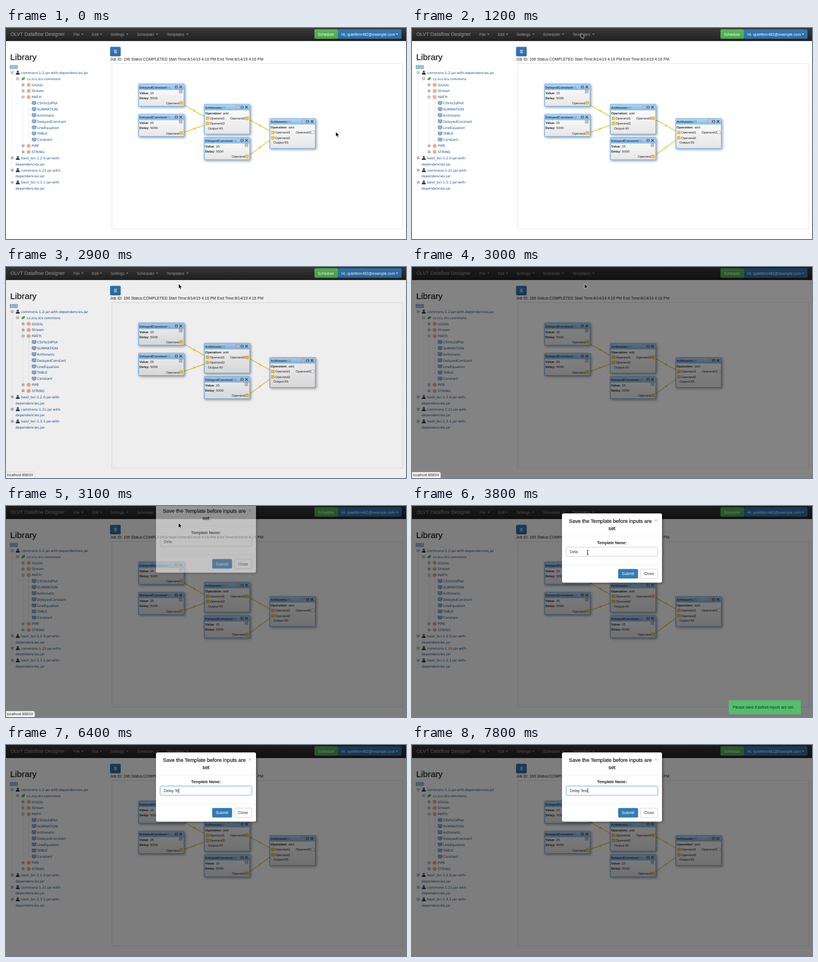
An HTML page that plays this animation: 712x376 px, repeating every 8 s.

```html
<!DOCTYPE html>
<html lang="en">
<head>
<meta charset="utf-8">
<title>Workflow designer</title>
<style>
html, body { margin: 0; width: 100%; height: 100%; overflow: hidden; background: #fff; }
svg { display: block; width: 712px; height: 376px; }
text { font-family: "Liberation Sans", Arial, sans-serif; white-space: pre; }
.tree text { font-family: "DejaVu Sans", Verdana, sans-serif; font-size: 6px; fill: #14528f; }
</style>
</head>
<body>
<svg id="stage" viewBox="0 0 712 376" xmlns="http://www.w3.org/2000/svg">
  <defs>
    <linearGradient id="nav" x2="0" y2="1"><stop stop-color="#3a3a3a"/><stop offset="1" stop-color="#202020"/></linearGradient>
    <linearGradient id="blue" x2="0" y2="1"><stop stop-color="#337ab7"/><stop offset="1" stop-color="#2d6ca5"/></linearGradient>
    <linearGradient id="green" x2="0" y2="1"><stop stop-color="#5cb85c"/><stop offset="1" stop-color="#4ba64b"/></linearGradient>
    <linearGradient id="body" x2="0" y2="1"><stop stop-color="#fff"/><stop offset="1" stop-color="#e6e6e6"/></linearGradient>
    <linearGradient id="head" x2="0" y2="1"><stop stop-color="#aed4f6"/><stop offset="1" stop-color="#8abce8"/></linearGradient>
    <filter id="shadow" x="-20%" y="-20%" width="150%" height="160%">
      <feDropShadow dx="1.6" dy="1.6" stdDeviation="2" flood-color="#000" flood-opacity=".4"/>
    </filter>
    <filter id="glow" x="-10%" y="-40%" width="120%" height="180%">
      <feDropShadow dx="0" dy="0" stdDeviation="1.2" flood-color="#66afe9" flood-opacity=".5"/>
    </filter>
  </defs>
  <g id="page"></g>
  <g id="menu"></g>
  <rect id="dim" width="712" height="376"/>
  <g id="modal"></g>
  <g id="toast"></g>
  <g id="status"></g>
  <g id="arrow"><path d="M0 0V8.6L2 6.8L3.4 9.8L4.8 9.1L3.5 6.2H6.2Z" fill="#000" stroke="#fff" stroke-width=".6"/></g>
  <g id="hand"><path d="M-.6 .6Q.3-.6 1 .6V3.4L4.6 4.2Q5.2 4.5 5 6L4.2 9H.2L-2.6 5.6Q-2.4 4.4-.6 5.6Z" fill="#fff" stroke="#111" stroke-width=".8"/></g>
  <g id="beam"><path d="M-1.7-4.2Q0-4.2 0-3Q0-4.2 1.7-4.2M0-3V3M-1.7 4.2Q0 4.2 0 3Q0 4.2 1.7 4.2M-.9 .8H.9" fill="none" stroke="#111" stroke-width=".8"/></g>
</svg>
<script>
const LOOP = 8000, STEP = 100;
const $ = id => document.getElementById(id);

// Markup helpers
const text = (x, y, s, size = 6.9, fill = '#333', more = '') =>
  `<text x="${x}" y="${y}" font-size="${size}" fill="${fill}" ${more}>${s}</text>`;
const rect = (x, y, w, h, fill, more = '') =>
  `<rect x="${x}" y="${y}" width="${w}" height="${h}" fill="${fill}" ${more}/>`;
const path = (d, stroke, width = 1, more = '') =>
  `<path d="${d}" fill="none" stroke="${stroke}" stroke-width="${width}" ${more}/>`;
const circle = (x, y, r, fill, more = '') => `<circle cx="${x}" cy="${y}" r="${r}" fill="${fill}" ${more}/>`;
const caretDown = (x, y, fill) => `<path d="M${x} ${y}h4l-2 2.1z" fill="${fill}"/>`;
const BOLD = 'font-weight="700"';
const MEDIUM = 'stroke="#222" stroke-width=".25"';

function navbar() {
  const items = [['File', 120, 134], ['Edit', 153, 167], ['Settings', 186, 214], ['Scheduler', 233, 267], ['Templates', 286, 321]];
  return rect(0, 0, 712, 23, 'url(#nav)') + rect(0, 22.5, 712, .7, '#101010') +
    `<rect id="openTab" x="279" y="0" width="53" height="23" fill="#0b0b0b"/>` +
    text(8, 14, 'OLVT Dataflow Designer', 8.82, '#9d9d9d') +
    items.map(([name, x, cx]) => `<g ${name === 'Templates' ? 'id="templates"' : ''} fill="#9d9d9d">` +
      `<text x="${x}" y="13.5" font-size="6.86">${name}</text><path d="M${cx} 10.2h4l-2 2.1z"/></g>`).join('') +
    rect(549, 2.2, 42, 17, 'url(#green)', 'rx="2"') + text(555, 13.5, 'Schedule', 6.9, '#fff') +
    rect(591, 2.2, 113, 17, 'url(#blue)', 'rx="2"') +
    text(597, 13.5, 'Hi, quietfern482@example.com', 6.8, '#fff') + caretDown(694, 10.2, '#fff');
}

const icons = {
  jar: (x, y) => circle(x, y - 1.6, 1.9, '#24364e') + `<path d="M${x - 3.6} ${y + 3.4}q0-3.4 3.6-3.4t3.6 3.4z" fill="#24364e"/>` +
    rect(x - 1, y - 1.6, 2, 1.4, '#8fa6c2'),
  leaf: (x, y) => `<path d="M${x - 3} ${y + 2.6}q-.6-5.4 6-5.6q.6 6-6 5.6z" fill="#4caf3f"/>`,
  ring: (x, y) => circle(x, y, 2.9, '#f8cdb0', 'stroke="#e5854f" stroke-width=".9"') + circle(x, y, 1, '#df7038'),
  screen: (x, y) => rect(x - 3.5, y - 3, 7, 4.8, '#8fb4dc', 'stroke="#5f82ac" stroke-width=".7"') + rect(x - 1.8, y + 2.3, 3.6, 1, '#7d8c9c')
};
const expander = (x, y, open) => rect(x - 2, y - 2, 4, 4, '#f4f4f4', 'stroke="#8a8a8a" stroke-width=".6"') +
  path(`M${x - 1.2} ${y}h2.4` + (open ? '' : `M${x} ${y - 1.2}v2.4`), '#444', .6);

function tree() {
  const rows = [
    [0, 'jar', 'commons-1.2-jar-with-dependencies.jar', 1], [1, 'leaf', 'cz.zcu.kiv.commons', 1],
    [2, 'ring', 'IOUtils'], [2, 'ring', 'Stream'], [2, 'ring', 'MATH', 1],
    ...['CSVto2dPlot', 'SUMMATION', 'Arithmetic', 'DelayedConstant', 'LineEquation', 'TABLE', 'Constant'].map(n => [3, 'screen', n]),
    [2, 'ring', 'PIPE'], [2, 'ring', 'STRING'],
    ...['basil_bci-1.2.0-jar-with-', 'commons-1.21-jar-with-', 'basil_bci-1.3.1-jar-with-']
      .flatMap(n => [[0, 'jar', n], [-1, '', 'dependencies.jar']])
  ];
  const rowY = i => 79.6 + i * 10.86;
  const guide = 'stroke-dasharray=".8 1"';
  let out = path(`M11 80V${rowY(18)}M21 91V${rowY(1)}M30.5 95V${rowY(13)}M40.5 127V${rowY(11)}`, '#bbb', .5, guide);
  rows.forEach(([level, icon, name, open], i) => {
    const y = rowY(i), x = 11 + level * 9.7;
    if (level < 0) { out += `<text x="17" y="${y + 2.2}">${name}</text>`; return; }
    out += path(`M${x} ${y}h8`, '#bbb', .5, guide);
    if (level < 3) out += expander(x, y, open);
    out += icons[icon](x + 10, y) + `<text x="${[27, 37, 46, 55.3][level]}" y="${y + 2.2}">${name}</text>`;
  });
  for (const x of [7.5, 14.8]) out += rect(x, 66.8, 5.4, 5.4, '#eaf3fc', 'stroke="#2f73b5" stroke-width=".9"') +
    path(`M${x + 1.3} 69.5h2.8M${x + 2.7} 68.1v2.8`, '#2f73b5', .8);
  return `<g class="tree">${out}</g>`;
}

const port = (x, y, fill = '#f7c53c') => rect(x - 2.5, y - 2.5, 5, 5, fill, `stroke="${fill === '#fff' ? '#999' : '#d3a02a'}" stroke-width=".6"`);
const grid = (x, y) => rect(x - 2.8, y - 2.8, 5.6, 5.6, '#e4e8ec', 'stroke="#8a8f95" stroke-width=".6"') +
  path(`M${x - 2.8} ${y - 1}h5.6m-5.6 2h5.6M${x - 1} ${y - 2.8}v5.6m2-5.6v5.6`, '#8f959b', .5);

function block(x, y, w, h, name, id, content) {
  const hx = x + w;
  return rect(x, y, w, h, 'url(#body)', 'stroke="#6fb0e6" stroke-width="1.3" rx="1" filter="url(#shadow)"') +
    rect(x + .7, y + .7, w - 1.4, 9.3, 'url(#head)') + path(`M${x} ${y + 10.2}h${w}`, '#7ab9ea', .6) +
    `<text x="${x + 1.3}" y="${y + 7.6}" font-size="6" font-weight="700" fill="#2b3f55">${name}` +
    `<tspan font-weight="400" fill="#71889c">#${id}</tspan></text>` +
    circle(hx - 13.8, y + 4.9, 2.9, '#667788') + rect(hx - 14.2, y + 4.4, .9, 2.3, '#fff') + rect(hx - 14.2, y + 3, .9, .9, '#fff') +
    path(`M${hx - 8.2} ${y + 2.6}l4.6 4.6m0-4.6l-4.6 4.6`, '#44566a', 1.3) + content;
}
const pair = (x, y, key, value) =>
  `<text x="${x}" y="${y}" font-size="6" fill="#222"><tspan font-weight="700">${key}</tspan>: ${value}</text>`;
const small = (x, y, s) => text(x, y, s, 6.05, '#222');

function constant(x, y, id, value) {
  return block(x, y, 81, 39.5, 'DelayedConstant', id,
    pair(x + 1.5, y + 17.5, 'Value', value) + pair(x + 1.5, y + 26.6, 'Delay', 5000) +
    grid(x + 75, y + 13.2) + small(x + 49, y + 35.7, 'Operand') + port(x + 76.2, y + 33.4));
}
function arithmetic(x, y, id, output, outPort) {
  return block(x, y, 81, 53, 'Arithmetic', id,
    grid(x + 59.5, y + 4.9) + pair(x + 1.5, y + 17.6, 'Operation', 'add') +
    port(x + 5.5, y + 24.6) + small(x + 9.4, y + 26.8, 'Operand1') + small(x + 46, y + 26.8, 'Operand3') + port(x + 76.3, y + 24.6, outPort) +
    port(x + 5.5, y + 34) + small(x + 9.4, y + 36.2, 'Operand2') + small(x + 6.4, y + 44.7, 'Output:' + output));
}
function wire(x1, y1, x2, y2) {
  const angle = Math.atan2(y2 - y1, x2 - x1) * 180 / Math.PI;
  return path(`M${x1} ${y1}L${x2} ${y2}`, '#f1c232', 1.4) +
    `<path d="M-2-2L2 0L-2 2" fill="none" stroke="#e8b828" stroke-width=".7" transform="translate(${(x1 + x2) / 2} ${(y1 + y2) / 2}) rotate(${angle})"/>`;
}

// Wires join port centres and pass beneath the blocks
$('page').innerHTML = rect(0, 0, 712, 376, '#fff') + navbar() +
  text(7.5, 57, 'Library', 15.4, '#222', MEDIUM) + tree() +
  rect(185.2, 33.5, 19, 17, 'url(#blue)', 'rx="2"') + path('M192.3 39.8h5M192.3 42h5M192.3 44.2h5', '#fff', 1) +
  text(185.3, 58, 'Job ID: 196 Status:COMPLETED Start Time:8/14/19 4:16 PM End Time:8/14/19 4:16 PM', 6.95, '#222') +
  rect(188.5, 63.5, 518, 294.5, 'none', 'stroke="#c4c4c4" stroke-width=".8" stroke-dasharray="1.2 1"') +
  wire(312, 134.5, 358.5, 160.8) + wire(312, 187.8, 358.5, 171) + wire(429.5, 161.2, 475, 186.5) + wire(429.5, 229.2, 475, 196) +
  constant(236, 100, 1, 15) + constant(236, 153.8, 2, 25) + arithmetic(353, 136.2, 4, 40) +
  constant(353, 195.3, 3, 15) + arithmetic(469.6, 161.6, 5, 55, '#fff');

$('menu').innerHTML = rect(279, 23.5, 114, 56.5, '#fff', 'rx="1.5" stroke="#c6c6c6" stroke-width=".6" filter="url(#shadow)"') +
  ['Save Template without data', 'Open Templates (no data)', 'Save Workflow with results', 'Open WorkFlows (with results)']
    .map((s, i) => text(289.3, 35 + i * 12.85, s, 6.9, '#333')).join('');

$('modal').innerHTML = rect(267, 13.3, 178, 123.2, '#fff', 'rx="3" filter="url(#shadow)"') +
  text(353, 30.2, 'Save the Template before inputs are', 9.2, '#222', 'text-anchor="middle" ' + MEDIUM) +
  text(356, 42.8, 'set', 9.2, '#222', 'text-anchor="middle" ' + MEDIUM) +
  path('M432.3 23.8l4 4m0-4l-4 4', '#b5b5b5', 1) +
  path('M267 53.3h178M267 104.6h178', '#e3e3e3', .6) +
  text(356, 68, 'Template Name:', 6.95, '#222', BOLD + ' text-anchor="middle"') +
  `<rect id="field" x="274.5" y="73.3" width="163" height="16.3" rx="2" fill="#fff"/>` +
  `<text id="entry" x="281" y="84" font-size="6.8" fill="#333"></text><path id="caret" stroke="#222" stroke-width=".8"/>` +
  rect(367, 112.2, 35.4, 17, '#337ab7', 'rx="2"') + text(384.6, 123.4, 'Submit', 7.1, '#fff', 'text-anchor="middle"') +
  rect(406.8, 112.5, 30.7, 16.7, '#fff', 'rx="2" stroke="#c4c4c4" stroke-width=".7"') + text(422, 123.4, 'Close', 7, '#333', 'text-anchor="middle"');

$('toast').innerHTML = rect(563.7, 346.3, 128.3, 24.7, '#52bf6c') + text(571, 361.2, 'Please save it before inputs are set.', 6.86, '#1d2a20');
$('status').innerHTML = `<path d="M-1 377V365.5H48.5Q51 365.5 51 368V377Z" fill="#f7f7f7" stroke="#b5b5b5" stroke-width=".6"/>` +
  text(1.5, 373.2, 'localhost:8680/#', 6.45, '#333');

// Timeline
const clamp = v => Math.max(0, Math.min(1, v));
const span = (t, from, to) => clamp((t - from) / (to - from));
const smooth = p => p * p * (3 - 2 * p);
const easeOut = p => 1 - (1 - p) ** 1.7;
const backOut = p => 1 + 2 * (p - 1) ** 3 + (p - 1) ** 2;
const show = (id, on) => $(id).setAttribute('visibility', on ? 'visible' : 'hidden');

const moves = [[0, 587, 185], [900, 301, 5], [1100, 301, 6], [1200, 301, 9.5], [1500, 301, 9.5],
  [1800, 304, 10], [2300, 304, 10], [2700, 307.5, 30], [3100, 307, 30], [3700, 312.5, 83]];
const typed = [[0, 'Dela'], [5500, 'Delay'], [5700, 'Delay '], [5900, 'Delay T'], [6200, 'Delay Te'], [6500, 'Delay Tes'], [6800, 'Delay Test']];

function cursorAt(t) {
  const i = moves.findIndex(m => m[0] > t);
  if (i < 0) return moves[moves.length - 1].slice(1);
  const [a, b] = [moves[i - 1], moves[i]], p = smooth(span(t, a[0], b[0]));
  return [a[1] + (b[1] - a[1]) * p, a[2] + (b[2] - a[2]) * p];
}

function draw(t) {
  const open = t >= 2000 && t < 2900, hover = t >= 1600 && t < 2900;
  show('menu', open);
  show('openTab', open);
  $('templates').setAttribute('fill', hover ? '#fff' : '#9d9d9d');
  show('status', t >= 2000 && t < 3400);

  $('dim').setAttribute('opacity', .51 * smooth(span(t, 2865, 3020)));
  $('modal').setAttribute('opacity', span(t, 3020, 3170));
  $('modal').setAttribute('transform', `translate(0 ${-30 * (1 - easeOut(span(t, 3020, 3320)))})`);

  const focus = t >= 4300;
  $('field').setAttribute('stroke', focus ? '#66afe9' : '#c4c4c4');
  $('field').setAttribute('stroke-width', .8);
  $('field').setAttribute('filter', focus ? 'url(#glow)' : 'none');
  const [since, value] = typed.filter(k => k[0] <= t).pop();
  const entry = $('entry');
  entry.textContent = value;
  const x = 281.4 + entry.getComputedTextLength();
  $('caret').setAttribute('d', `M${x} 77.2V85.8`);
  show('caret', focus && (t - Math.max(since, 4300)) % 1000 < 500);

  const slide = t < 5000 ? 1 - backOut(span(t, 3150, 3650)) : span(t, 6150, 6500);
  $('toast').setAttribute('transform', `translate(${299 * slide} 0)`);
  show('toast', t > 3150 && t < 6500);

  const [cx, cy] = cursorAt(t);
  const shape = t >= 5500 ? '' : t >= 3500 ? 'beam' : hover ? 'hand' : 'arrow';
  for (const id of ['arrow', 'hand', 'beam']) {
    show(id, id === shape);
    $(id).setAttribute('transform', `translate(${cx} ${cy})`);
  }
}

const start = performance.now();
function tick() {
  const t = (performance.now() - start) % LOOP;
  draw(Math.floor(t / STEP) * STEP);
  requestAnimationFrame(tick);
}
tick();
</script>
</body>
</html>
```
